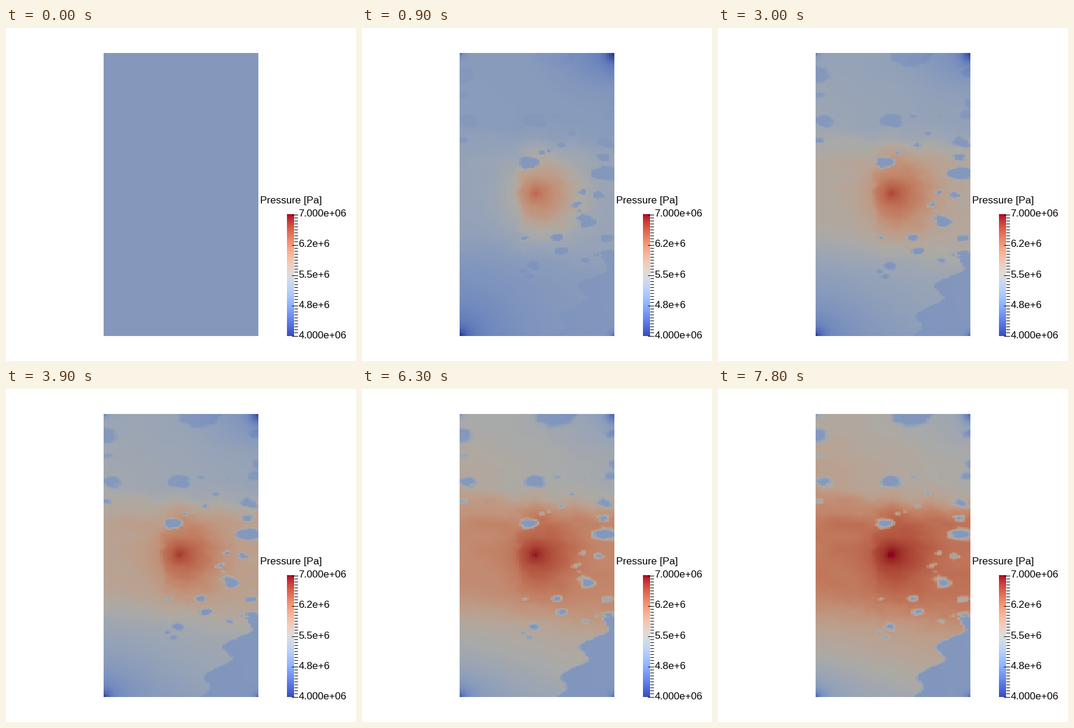
Write a matplotlib script that moves like this. It is 588 by 560 pixels and loops after 8 s.

```python
import numpy as np
import matplotlib.pyplot as plt
from matplotlib.animation import FuncAnimation
from matplotlib.colors import ListedColormap

W, H, DPI = 588, 560, 100
LEFT, RIGHT, TOP, BOTTOM = 164, 424, 42, 518
COLS, ROWS = 60, 220
START = 1 / 3
LAST_STEP = 26
rng = np.random.default_rng(10)

x = LEFT + (np.arange(COLS) + 0.5) * (RIGHT - LEFT) / COLS
y = TOP + (np.arange(ROWS) + 0.5) * (BOTTOM - TOP) / ROWS
X, Y = np.meshgrid(x, y)
east = (X - LEFT) / (RIGHT - LEFT)


def noise(nx, ny):
    """Smooth random field between -1 and 1 from an nx by ny lattice."""
    lattice = rng.uniform(-1, 1, (ny, nx))
    u, v = np.linspace(0, nx - 1, COLS), np.linspace(0, ny - 1, ROWS)
    wide = np.array([np.interp(u, np.arange(nx), row) for row in lattice])
    return np.array([np.interp(v, np.arange(ny), col) for col in wide.T]).T


def smoothstep(a, b, v):
    t = np.clip((v - a) / (b - a), 0, 1)
    return t * t * (3 - 2 * t)


def falloff(cx, cy, rx, ry, power=1):
    return np.exp(-np.hypot((X - cx) / rx, (Y - cy) / ry) ** power)


def island_depth(cx, cy, size):
    """Depth in pixels inside a flat ellipse, negative outside it."""
    radius = np.hypot((X - cx) / (1.3 * size), (Y - cy) / (0.8 * size))
    return (1 - radius) * 0.8 * size


# Tight rock: centre x, centre y, size
ISLANDS = [
    (166, 78, 18), (164, 112, 10), (177, 157, 14), (166, 188, 10),
    (325, 42, 30), (424, 75, 14), (424, 125, 11), (418, 147, 12),
    (290, 155, 16), (281, 225, 14), (408, 192, 13), (405, 217, 11),
    (408, 245, 17), (398, 281, 9), (361, 298, 8), (378, 324, 14),
    (327, 353, 8), (337, 374, 9), (416, 354, 9), (416, 381, 12),
    (290, 398, 10),
]
specks = zip(rng.uniform(250, 400, 14), rng.uniform(100, 440, 14),
             rng.uniform(4, 6, 14))
shore = 14 + 0.68 * (Y - 385) + 14 * np.cos(2 * np.pi * (Y - 481) / 50)
depth = np.where(Y > 384, shore - (RIGHT - X), -99)
for island in [*ISLANDS, *specks]:
    depth = np.maximum(depth, island_depth(*island))
depth += 3 * noise(30, 90) + 2 * noise(16, 50)

# Permeable rock: fast middle band, slower ends, central injector
warp = noise(9, 24)
rough = noise(30, 90)
WX = X + 6 * noise(14, 40) + 3 * rough
WY = Y + 9 * warp + 5 * noise(25, 60)
band = (smoothstep(148, 232, WY - 10 * east)
        * (1 - smoothstep(320, 420, WY - 25 * east)))
ends = (1.05 - 0.4 * east * (Y < 280)) * (0.78 + 0.22 * smoothstep(42, 150, Y))
ends *= 1 - 0.5 * smoothstep(400, 525, WY - 30 * east)
core = np.exp(-np.hypot((WX - 302) / 64, (WY - 283) / 62) ** 2.2)
core *= 0.55 + 0.45 * smoothstep(257, 270, WX)
well = falloff(291, 279, 15, 15)

low_left = falloff(LEFT, BOTTOM, 85, 85)
top_right = falloff(RIGHT, TOP, 80, 55, 2)
drains = (falloff(LEFT, TOP, 5, 5) + falloff(RIGHT, BOTTOM, 5, 5)
          + falloff(LEFT, BOTTOM, 9, 9) + falloff(RIGHT, TOP, 13, 15, 1.5))


def pressure(step):
    t = step / LAST_STEP
    opened = 1 - np.exp(-1.2 * step)
    rise = 0.24 * t ** 1.1 * ends * (1 - band) + 0.42 * t ** 0.8 * band
    rise = rise * (1 + 0.05 * warp) + opened * (0.29 - 0.17 * t) * core
    rise *= 1 - np.clip(depth / (1 + 6 * t), 0, 1)
    wells = (0.15 * well - 0.27 * drains - (0.18 - 0.06 * t) * low_left
             - (0.13 - 0.09 * t) * top_right)
    return START + rise + opened * wells


coolwarm = plt.get_cmap("coolwarm")
shaded = ListedColormap(coolwarm(np.linspace(0, 1, 256))[:, :3]
                        * (0.785, 0.77, 0.745))

fig = plt.figure(figsize=(W / DPI, H / DPI), dpi=DPI, facecolor="white")
ax = fig.add_axes([0, 0, 1, 1])
ax.axis("off")

field = ax.imshow(pressure(0), cmap=shaded, vmin=0, vmax=1, aspect="auto",
                  interpolation="nearest", extent=(LEFT, RIGHT, BOTTOM, TOP))
BAR_TOP, BAR_BOTTOM = 313, 518
ax.imshow(np.linspace(1, 0, 256)[:, None], cmap=coolwarm, vmin=0, vmax=1,
          aspect="auto", extent=(472, 484, BAR_BOTTOM, BAR_TOP))
ax.set(xlim=(0, W), ylim=(H, 0))

ticks = np.floor(np.linspace(BAR_TOP, BAR_BOTTOM - 1, 41)) + 0.5
ax.hlines(ticks, 484, 490, color="black", lw=0.72)
ax.hlines(ticks[::10], 480, 490, color="black", lw=0.72)

style = dict(family="Liberation Sans", size=17 * 72 / DPI, color="black",
             va="baseline")
ax.text(427, 295, "Pressure [Pa]", **style)
for i, label in enumerate(["7.000e+06", "6.2e+6", "5.5e+6", "4.8e+6",
                           "4.000e+06"]):
    ax.text(491.5, 317 + 51.25 * i, label, **style)


def update(frame):
    field.set_data(pressure(frame // 3))
    return [field]


anim = FuncAnimation(fig, update, frames=80, interval=100, repeat=True,
                     repeat_delay=0)
plt.show()
```
